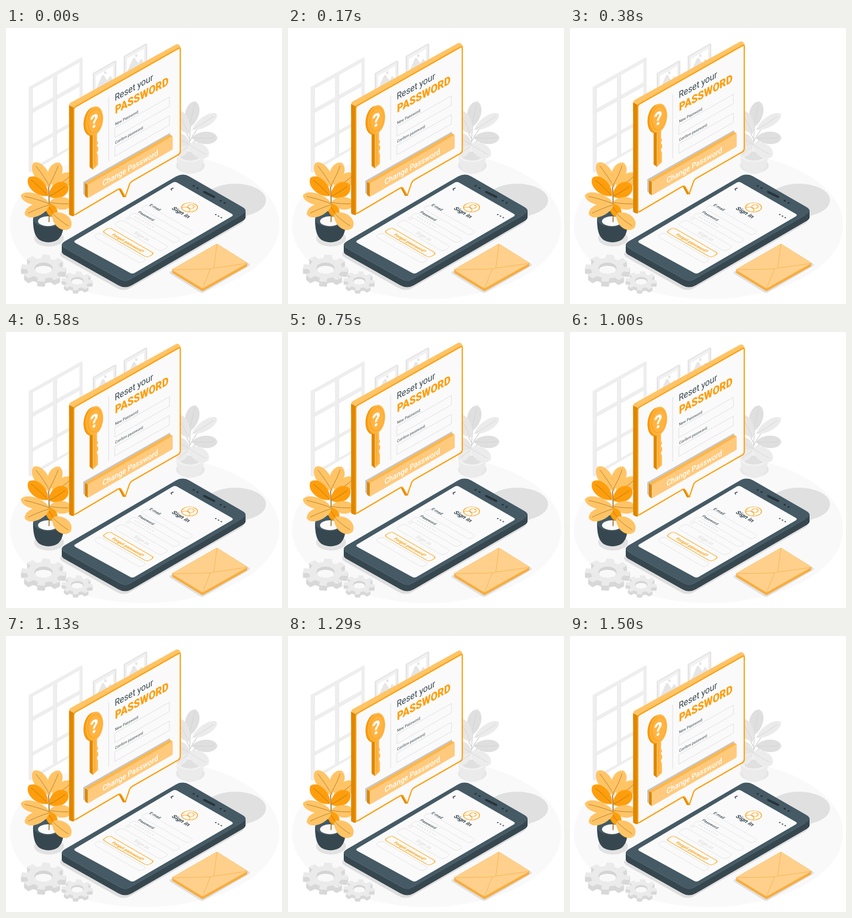
Recreate the animation shown at these times as an HTML page. Size 500x500 px, loop 1.54 s.

```html
<!DOCTYPE html>
<html lang="en">
<head>
<meta charset="utf-8">
<title>Reset your password</title>
<style>
html, body { margin: 0; width: 100%; height: 100%; overflow: hidden; background: #fff; }
svg { display: block; width: 100vw; height: 100vh; }
text { font-family: Roboto, sans-serif; }
</style>
</head>
<body>
<svg id="stage" viewBox="0 0 500 500"></svg>
<script>
const MAIN = '#ff9e0d', DEEP = '#de8600', LIGHT = '#ffc466', PALE = '#ffd08b', DARK = '#455a64', NIGHT = '#37474f';
const svg = document.getElementById('stage');

function add(parent, tag, attrs, content) {
  const el = document.createElementNS('http://www.w3.org/2000/svg', tag);
  for (const k in attrs) el.setAttribute(k, attrs[k]);
  if (content) el.textContent = content;
  parent.appendChild(el);
  return el;
}
const group = (parent, attrs = {}) => add(parent, 'g', attrs);
const fill = (p, d, color) => add(p, 'path', { d, fill: color });
const line = (p, d, color, width = 1) => add(p, 'path', {
  d, fill: 'none', stroke: color, 'stroke-width': width, 'stroke-linecap': 'round', 'stroke-linejoin': 'round'
});
const oval = (p, cx, cy, rx, ry, color) => add(p, 'ellipse', { cx, cy, rx, ry, fill: color });

// Closed polygon with corners softened by r
function poly(pts, r = 0) {
  const n = pts.length;
  const toward = (a, b) => {
    const len = Math.hypot(b[0] - a[0], b[1] - a[1]), k = Math.min(r / len, 0.5);
    return [a[0] + (b[0] - a[0]) * k, a[1] + (b[1] - a[1]) * k];
  };
  return pts.map((p, i) => {
    const a = toward(p, pts[(i + n - 1) % n]), b = toward(p, pts[(i + 1) % n]);
    return `${i ? 'L' : 'M'}${a}Q${p} ${b}`;
  }).join('') + 'Z';
}

// Solid slab: the side is swept downwards, the top drawn last
function slab(p, d, height, side, top) {
  for (let y = height; y > 0; y--) add(p, 'path', { d, fill: side, transform: `translate(0 ${y})` });
  return fill(p, d, top);
}

function leaf(p, x, y, tx, ty, w, color, vein) {
  const dx = tx - x, dy = ty - y, len = Math.hypot(dx, dy);
  const at = (k, s) => [x + dx * k - dy / len * w * s, y + dy * k + dx / len * w * s];
  fill(p, `M${x} ${y}C${at(0.2, 1.25)} ${at(0.9, 1.5)} ${tx} ${ty}C${at(0.9, -1.5)} ${at(0.2, -1.25)} ${x} ${y}Z`, color);
  line(p, `M${x} ${y}Q${at(0.5, 0.15)} ${at(0.86, 0)}`, vein, 0.7);
}

function gear(p, cx, cy, rx, ry, height) {
  const pts = [], teeth = 8;
  for (let i = 0; i < teeth; i++) {
    [[-0.28, 0.74], [-0.22, 1], [0.22, 1], [0.28, 0.74]].forEach(([o, r]) => {
      const a = (i + o + 0.15) / teeth * 2 * Math.PI;
      pts.push([cx + Math.cos(a) * rx * r, cy + Math.sin(a) * ry * r]);
    });
  }
  slab(p, poly(pts, 1.5), height, '#d8d8d8', '#ebebeb');
  oval(p, cx, cy, rx * 0.4, ry * 0.4, '#d4d4d4');
  oval(p, cx, cy + height * 0.32, rx * 0.37, ry * 0.29, '#f9f9f9');
}

function label(p, str, x, y, size, color, weight, matrix, anchor = 'start') {
  add(p, 'text', {
    transform: `matrix(${matrix} ${x} ${y})`, 'font-size': size, fill: color,
    'font-weight': weight, 'text-anchor': anchor
  }, str);
}
const WALL = '.87 -.48 0 1', FLOOR = '.866 .5 -.866 .5';

function drawRoom(p) {
  oval(p, 251, 357, 244, 134, '#f9f9f9');
  // window
  fill(p, 'M41 107L137 53L139 55V206L44 262L41 260Z', '#eeeeee');
  for (const [x0, x1] of [[48, 85], [92, 133]]) {
    const row = (a, b) => fill(p, poly([[x0, a - x0 * 0.56], [x1, a - x1 * 0.56], [x1, b - x1 * 0.56], [x0, b - x0 * 0.56]]), '#fff');
    row(137, 173); row(181, 237); row(244, 280);
  }
  line(p, 'M48 110V254M92 86V229', '#e4e4e4', 0.8);
  // wall pictures
  for (const [x, y] of [[157, 82], [213, 51]]) {
    const g = group(p, { transform: `translate(${x} ${y})` });
    fill(g, 'M0 0L40-23L43-22V35L0 59Z', '#e6e6e6');
    fill(g, 'M3 1L40-20V35L3 56Z', '#f1f1f1');
    fill(g, 'M6 5L37-13V31L6 48Z', '#fff');
    fill(g, 'M6 29L17 4Q20 1 23 8L27 13L31 5Q33 4 37 12V31L6 48Z', '#e6e6e6');
    oval(g, 23, -1, 2.2, 2.8, '#e6e6e6');
  }
}

function drawGreyPlant(p) {
  oval(p, 415, 312, 56, 30, '#e0e0e0');
  oval(p, 334, 249, 26, 14, '#e6e6e6');
  line(p, 'M333 226Q331 195 338 152M332 207Q345 180 366 163M332 212Q350 198 368 198M332 200Q322 180 312 166', '#d2d2d2', 1.4);
  const c = '#e6e6e6', d = '#dfdfdf', v = '#cfcfcf';
  leaf(p, 330, 181, 343, 133, 12, d, v);
  leaf(p, 331, 191, 308, 150, 12, c, v);
  leaf(p, 338, 184, 382, 156, 9, '#ebebeb', v);
  leaf(p, 337, 199, 383, 199, 11, d, v);
  leaf(p, 333, 212, 303, 196, 11, c, v);
  fill(p, 'M309 231H358C358 247 354 257 345 262Q334 267 323 262C313 257 309 246 309 231Z', '#ebebeb');
  oval(p, 333.5, 231, 24.5, 12, '#f1f1f1');
  oval(p, 333.5, 232, 18, 8, '#e0e0e0');
  leaf(p, 331, 210, 367, 232, 12, '#ececec', v);
  leaf(p, 331, 214, 309, 231, 8, '#ececec', v);
}

function drawOrangePlant(p) {
  oval(p, 78, 381, 27, 15, '#e2e2e2');
  fill(p, 'M49 346C49 368 53 379 62 384.5Q77 392 92 384.5C101 379 105 367 105 346Z', NIGHT);
  oval(p, 77, 346, 28, 14.5, DARK);
  oval(p, 76, 350, 18, 9, '#fafafa');
  const v = '#9d6518';
  line(p, 'M78 351Q79 310 76 267M77 324Q62 307 43 303M78 302Q94 289 110 276M78 331Q91 314 108 314', v, 1.6);
  leaf(p, 80, 288, 50, 244, 12, LIGHT, v);
  leaf(p, 78, 285, 97, 244, 12, LIGHT, v);
  leaf(p, 83, 292, 121, 265, 12, LIGHT, v);
  leaf(p, 76, 304, 41, 271, 12, MAIN, v);
  leaf(p, 78, 305, 112, 284, 13, MAIN, v);
  leaf(p, 78, 318, 27, 303, 10, LIGHT, v);
  leaf(p, 78, 316, 119, 319, 11, LIGHT, v);
  leaf(p, 74, 318, 90, 341, 9, MAIN, v);
  leaf(p, 79, 320, 34, 338, 11, LIGHT, v);
  leaf(p, 84, 336, 117, 362, 13, LIGHT, v);
}

function field(p, x, y, w, h, color, width = 0.8) {
  add(p, 'rect', {
    transform: `matrix(${FLOOR} ${x} ${y})`, x: -w / 2, y: -h / 2, width: w, height: h, rx: 5,
    fill: '#fafafa', stroke: color, 'stroke-width': width
  });
}

function drawAvatar(p) {
  const g = group(p, { transform: `matrix(${FLOOR} 332.5 325)`, fill: 'none', stroke: MAIN, 'stroke-width': 1.2 });
  add(g, 'circle', { r: 11.8 });
  add(g, 'circle', { cy: -3, r: 4.7 });
  add(g, 'path', { d: 'M-7.5 9C-6.5 0 6.5 0 7.5 9' });
}

function drawPhone(p) {
  const body = poly([[95, 393], [320, 262], [440, 331], [216, 461]], 14);
  add(p, 'path', { d: body, fill: '#dedede', transform: 'translate(-3 17)' });
  slab(p, body, 12, NIGHT, DARK);
  line(p, 'M104 395L112 402L209 456Q216 460 223 456L426 339', '#546b76', 0.8);
  fill(p, poly([[121.5, 387], [306, 277.8], [413, 339], [229, 446]], 5), '#fafafa');
  for (const [x, y] of [[340, 286], [347, 290], [389, 313], [396, 317]]) oval(p, x, y, 2, 1.4, '#263238');
  line(p, 'M359 297L377 306', '#263238', 4);
  line(p, 'M303 290L299 291.5L300 294', NIGHT, 1.5);
  for (const i of [0, 1, 2]) oval(p, 380 + i * 5, 338 + i * 2.7, 1.5, 1, NIGHT);
  drawAvatar(p);
  label(p, 'Sign in', 299, 327.5, 11.2, NIGHT, 700, FLOOR);

  const rim = '#e2e2e2';
  field(p, 292, 348, 98, 13, rim);
  field(p, 269, 362, 98, 13, rim);
  field(p, 245, 376, 98, 17, rim);
  field(p, 206, 398.5, 98, 13, rim);
  field(p, 221.5, 388.7, 94, 15, MAIN, 1.2);
  add(p, 'rect', { transform: `matrix(${FLOOR} 221 345)`, x: -2.5, y: -2.5, width: 5, height: 5, rx: 1, fill: 'none', stroke: rim, 'stroke-width': 0.8 });
  for (let i = 0; i < 8; i++) oval(p, 235 + i * 4.4, 342.5 + i * 2.5, 1, 0.7, '#c9c9c9');
  label(p, 'E-mail', 259, 321, 7.5, NIGHT, 500, FLOOR);
  label(p, 'Password', 238.5, 334, 7.1, NIGHT, 500, FLOOR);
  label(p, 'Sign in', 243, 379, 9.8, '#dedede', 500, FLOOR, 'middle');
  label(p, 'Forgot password?', 218.8, 391, 8, MAIN, 700, FLOOR, 'middle');
}

function drawEnvelope(p) {
  fill(p, poly([[294, 443], [382, 394], [444, 429], [355, 481]], 5), '#e0e0e0');
  const sheet = poly([[300, 438], [382, 391], [438, 426], [356, 472]], 2);
  slab(p, sheet, 5, '#f7ad3f', PALE);
  line(p, sheet, '#f9b650', 0.6);
  line(p, 'M301 438L370 436.5Q376 436 377 431L382 392M376 435L437 426.5M370 437L356 472', '#f5ae48', 0.8);
}

function drawKey(p) {
  // shaft, then head
  fill(p, 'M151.5 190L158 187V257L151.5 252Z', DEEP);
  fill(p, 'M157 190L165 186V205L167 208L164.5 213L167 217V221L164.5 226L166.5 231V248L157 257Z', '#ffb84d');
  line(p, 'M161 193V249', MAIN, 1);
  const head = (x, y, rx, ry, color) => add(p, 'ellipse', { rx, ry, fill: color, transform: `matrix(1 -.3 0 1 ${x} ${y})` });
  head(156, 169.5, 15.5, 25.5, DEEP);
  head(157.5, 169, 16, 25.5, MAIN);
  head(160.5, 168, 15.5, 25.5, '#ffb443');
  head(160.5, 168, 13, 21.5, MAIN);
  head(161, 168, 12, 20.5, '#ffb443');
  label(p, '?', 160, 180.5, 33, '#fff', 800, '.85 -.4 0 1', 'middle');
}

function drawBubble(p) {
  fill(p, poly([[114.3, 137], [311, 28], [316.8, 33.5], [316.8, 45], [123, 160], [114.3, 160]], 4), LIGHT);
  fill(p, 'M114.3 140L123 144.5V341Q118 341.5 114.3 338Z', DEEP);
  fill(p, 'M201 291L205 293.5L212 306.5L218 306L210 287Z', DEEP);
  const front = poly([[122.8, 144.5], [315.7, 35], [315.7, 227.5], [225, 279.5], [216, 306], [207, 290], [122.8, 339.5]], 4);
  add(p, 'path', { d: front, fill: '#fafafa', stroke: MAIN, 'stroke-width': 2.2, 'stroke-linejoin': 'round' });
  drawKey(p);
  line(p, 'M186 125V241', '#dcdcdc', 0.9);

  label(p, 'Reset your', 197, 132.5, 17, NIGHT, 400, WALL);
  label(p, 'PASSWORD', 197.5, 156, 20.8, MAIN, 900, WALL);
  label(p, 'New Password:', 197.5, 177, 7.2, NIGHT, 400, WALL);
  label(p, 'Confirm password:', 197.5, 210.5, 7.1, NIGHT, 400, WALL);
  for (const y of [181, 215]) line(p, `M197.5 ${y}L296 ${y - 56}V${y - 39}L197.5 ${y + 17}Z`, '#d8d8d8', 0.8);

  // button
  fill(p, 'M140 279L297 190V197L143 303L140 301Z', '#c6c6c6');
  fill(p, 'M143 281L297 193L302 196L148 285Z', '#ffb648');
  fill(p, 'M143 281L148 284V308L143 304.5Z', DEEP);
  fill(p, poly([[148, 284], [302, 196], [302, 220], [148, 308.5]], 1.5), '#ffca7d');
  label(p, 'Change Password', 175, 286.5, 14.3, '#fff', 500, '.87 -.488 0 1');
}

drawRoom(svg);
drawGreyPlant(svg);
drawOrangePlant(svg);
drawPhone(svg);
drawEnvelope(svg);
gear(svg, 68, 435, 41, 25, 9);
gear(svg, 129, 458, 28.5, 17.5, 6);
const bubble = group(svg);
drawBubble(bubble);

// Linear float, 10 units up and back, at 24 steps a second
const LOOP = 1540, STEPS = 37, HALF = 18, LIFT = 10;
function render(ms) {
  const step = Math.floor((ms % LOOP) / LOOP * STEPS + 0.15);
  const rise = LIFT * (1 - Math.abs(1 - step / HALF));
  bubble.setAttribute('transform', `translate(0 ${-Math.max(0, rise)})`);
}
const start = performance.now();
function tick(now) {
  render(Math.max(0, now - start));
  requestAnimationFrame(tick);
}
render(0);
requestAnimationFrame(tick);
</script>
</body>
</html>
```
